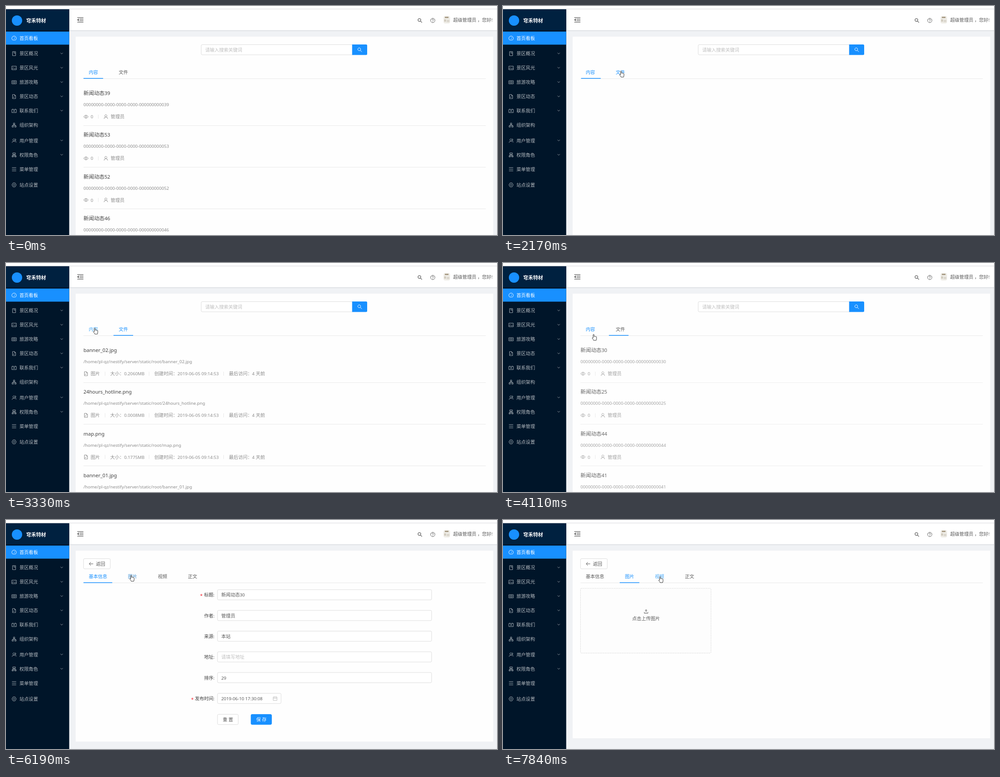
Animation, 1093 px wide and 512 px high, one loop 7990 ms. Source, as an HTML page:

```html
<!DOCTYPE html>
<html lang="zh-CN">
<head>
<meta charset="utf-8">
<style>
html, body { margin: 0; width: 100%; height: 100%; overflow: hidden; background: #fff }
svg { display: block; font-family: "Noto Sans", "Noto Sans CJK SC", "Noto Sans CJK", sans-serif }
text { white-space: pre }
.title tspan { font-weight: 500 }
</style>
</head>
<body>
<svg id="stage" width="1093" height="512" viewBox="0 0 1093 512"></svg>
<script>
const LOOP = 7990, BLUE = '#1890ff', HOVER = '#40a9ff', INK = '#595959', GREY = '#8c8c8c', SIZE = 10.3;

// Latin runs are set slightly smaller than the Chinese around them; y is the middle of the line.
const text = (x, y, s, fill = INK, size = SIZE, attrs = '') =>
  `<text x="${x}" y="${y + size * .37}" font-size="${size}" fill="${fill}" ${attrs}>` +
  s.replace(/[ -~]+/g, run => `<tspan font-size="${size * .945}">${run}</tspan>`) + '</text>';
const rect = (x, y, w, h, fill, attrs = '') =>
  `<rect x="${x}" y="${y}" width="${w}" height="${h}" fill="${fill}" ${attrs}/>`;
const box = (x, y, w, h, fill = '#fff', stroke = '#d4d4d4') =>
  rect(x, y, w, h, fill, `rx="2.5" stroke="${stroke}" stroke-width=".8"`);
const icon = (x, y, d, stroke = GREY, width = 1) =>
  `<path transform="translate(${x} ${y})" d="${d}" fill="none" stroke="${stroke}" stroke-width="${width}"/>`;
const group = (id, body) => `<g id="${id}">${body}</g>`;
const rule = y => rect(172.5, y, 895.5, .8, '#e4e4e4');

const ICON = {
  dash: 'M-3.3 4A5 5 0 1 1 3.3 4ZM0 1L2-1.5',
  book: 'M-3.5-4.5h7v9h-7zM0-4.5v4l1.5-1 1.5 1',
  picture: 'M-5-4H5V4H-5zM-5 2.5L-2-.5 .5 2 2.5 0 5 2.5',
  read: 'M0-3.5H-5v7H5v-7H0V3.5M-3.5-1h2M-3.5 1h2M1.5-1h2M1.5 1h2',
  file: 'M-3.5-4.5H1L3.5-2V4.5H-3.5zM1-4.5V-2H3.5M-2 2.5l1.3-2 1 1 1.2-1',
  contact: 'M-5-3H5V4H-5zM-3-4.5V-3M3-4.5V-3M-1.5 2.3L0-1.5 1.5 2.3',
  tree: 'M-1.5-4.5h3v3h-3zM-4.5 1.5h3v3h-3zM1.5 1.5h3v3h-3zM0-1.5V0M-3 1.5V0H3V1.5',
  users: 'M-.5-4a2.2 2.2 0 1 1-.1 0M-4.5 4.5A3.7 3.7 0 0 1 2 2.5M2-4a2 2 0 0 1 0 4Q4.3 1 4.5 4',
  roles: 'M-3-4.5h6v3h-6zM-4.5 2h2.5v2.5h-2.5zM2 2h2.5v2.5H2zM0-1.5V4.5M-3.5 2V.3H3.5V2',
  bars: 'M-4.7-3.7h9.4M-4.7 0h9.4M-4.7 3.7h9.4',
  gear: 'M-2.3-4.4H2.3L4.8 0 2.3 4.4H-2.3L-4.8 0zM1.7 0A1.7 1.7 0 1 1 1.7-.01z',
  search: 'M2-1.2A3.2 3.2 0 1 1 2-1.21zM1.1 1.1L4.6 4.6',
  eye: 'M-5 0Q0-7 5 0 0 7-5 0zM1.6 0A1.6 1.6 0 1 1 1.6-.01z',
  person: 'M2.4-2A2.4 2.4 0 1 1 2.4-2.01zM-4 4.7A4 4 0 0 1 4 4.7'
};

const menu = [
  [72, '首页看板', 'dash'], [106.5, '景区概况', 'book', 1], [138.5, '景区风光', 'picture', 1],
  [170.5, '旅游攻略', 'read', 1], [202.5, '景区动态', 'file', 1], [234.3, '联系我们', 'contact', 1],
  [266.3, '组织架构', 'tree'], [301, '用户管理', 'users', 1], [333, '权限角色', 'roles', 1],
  [365, '菜单管理', 'bars'], [400, '站点设置', 'gear']
].map(([y, label, name, arrow], i) => {
  const color = i ? '#b2b8be' : '#fff';
  return icon(18, y, ICON[name], color, .9) + text(30, y, label, color) +
    (arrow ? icon(124, y - .5, 'M-2.6-1.4L0 1.3 2.6-1.4', '#8c949c') : '');
}).join('');

const sidebar = rect(0, 7.5, 140.7, 504.5, '#001529') + rect(0, 7.5, 140.7, 47, '#002140') +
  rect(0, 57.2, 140.7, 29.2, BLUE) + `<circle cx="24.5" cy="32.5" r="11.5" fill="${BLUE}"/>` +
  text(45, 32.5, '穹禾特材', '#fff', 11, 'font-weight="700"') + menu;

const header = rect(0, 6.3, 1093, 1.2, '#d5d5da') + rect(140.5, 7.5, 952.5, 46.7, '#fff') +
  [.08, .045, .02].map((a, i) => rect(140.5, 54 + i, 952.5, 1, `rgba(0,21,41,${a})`)).join('') +
  icon(165.5, 31, 'M-6.8-5.2H6.8M-1.8-1.7H6.8M-1.8 1.7H6.8M-6.8 5.2H6.8M-4-2L-6.3 0-4 2z', INK, 1.2) +
  icon(921.5, 32.5, ICON.search, INK, 1.2) +
  icon(950, 32.3, 'M4.8 0A4.8 4.8 0 1 1 4.8-.01zM-1.6-1A1.6 1.6 0 1 1 .6.3L0 .7V1.3M0 2.2V3.2', INK) +
  rect(974, 22.5, 14.5, 16.5, '#eeece6', 'rx="4"') + rect(977, 24, 8, 3, '#a99c86') +
  rect(975.5, 30, 4, 5, '#cfcabd') + rect(981, 31, 6, 5, '#dcd8cf') +
  text(995.5, 31.5, '超级管理员 ，您好!');

const list = items => items.map(([title, desc, meta], i) => {
  const y = 195 + 93.1 * i;
  return text(172.5, y, title, '#404040', 11.7, 'class="title"') +
    text(172.5, y + 25.5, desc, GREY) + meta(y + 52.5) + rule(Math.round(y + 72));
}).join('');

const divider = (x, y) => rect(x, y - 4.5, 1, 9, '#e8e8e8');
const news = ids => list(ids.map(n => ['新闻动态' + n, '00000000-0000-0000-0000-0000000000' + n, y =>
  icon(178, y, ICON.eye) + text(188.5, y, '0', GREY) + divider(205, y) +
  icon(222.3, y, ICON.person) + text(233, y, '管理员', GREY)]));
const files = entries => list(entries.map(([name, size]) => [name, '/home/pl-qz/nestify/server/static/root/' + name, y =>
  icon(178, y, ICON.file) + text(188.5, y, '图片', GREY) + divider(220, y) +
  text(232, y, `大小：${size}MB`, GREY) + divider(318, y) +
  text(330.3, y, '创建时间：2019-06-05 09:14:53', GREY) + divider(484, y) +
  text(496.3, y, '最后访问：4 天前', GREY)]));

const searchPage = box(434.6, 86.4, 340, 22.7) + text(443.5, 98.5, '请输入搜索关键词', '#bfbfbf') +
  `<path d="M770.5 86H801.5a2.5 2.5 0 0 1 2.5 2.5V107a2.5 2.5 0 0 1-2.5 2.5H770.5z" fill="${BLUE}"/>` +
  icon(787.5, 98, ICON.search, '#fff') + rule(162) +
  text(184.2, 148, '内容', BLUE, SIZE, 'id="tabNews"') + text(251, 148, '文件', INK, SIZE, 'id="tabFiles"') +
  rect(172.5, 161, 43.7, 1.5, BLUE, 'id="listBar"');

const detailPage = box(172.6, 86.4, 59.5, 22.7) + icon(189.5, 98, 'M4.7 0H-4.2M-.5-3.8L-4.4 0-.5 3.8', INK) +
  text(200.3, 98, '返回') + rule(140.2) +
  text(184.2, 126, '基本信息', BLUE, SIZE, 'id="tabBasic"') + text(271.5, 126, '图片', INK, SIZE, 'id="tabImage"') +
  text(338.2, 126, '视频', INK, SIZE, 'id="tabVideo"') + text(405, 126, '正文') +
  rect(172.5, 139.4, 64, 1.5, BLUE, 'id="detailBar"');

const star = (x, y) => text(x, y + 1, '*', '#f5222d', 11);
const form = [['标题', '新闻动态30'], ['作者', '管理员'], ['来源', '本站'], ['地址', '请填写地址', '#bfbfbf'], ['排序', '29']]
  .map(([label, value, color], i) => {
    const y = 167.5 + 46.3 * i;
    return text(441, y, label + ':', '#404040') + box(470.8, y - 11.7, 476.7, 22.8) + text(479.3, y, value, color);
  }).join('') + star(432, 167.5) + star(412, 399.5) +
  text(420.4, 399.5, '发布时间:', '#404040') + box(470.8, 387.5, 141.5, 22.8) +
  text(479.3, 399.5, '2019-06-10 17:30:08') +
  icon(599, 399.3, 'M-4.2-3.5H4.2V4H-4.2zM-4.2-.7H4.2M-2-4.7V-2.5M2-4.7V-2.5', '#bfbfbf') +
  box(470.8, 434.5, 46.2, 22.8) + text(482.5, 446.3, '重 置') +
  box(545.3, 434.5, 46, 22.8, BLUE, BLUE) + text(557, 446.3, '保 存', '#fff');

const upload = rect(172.5, 152.8, 290.5, 144.7, '#fdfdfd', 'rx="2" stroke="#d4d4d4" stroke-dasharray="2.2 1.6"') +
  icon(318.5, 204.5, 'M-4 1.2V4H4V1.2M0 2V-4M-2.2-1.8L0-4 2.2-1.8', INK) + text(287.5, 219.8, '点击上传图片');

const cursor = `<g id="cursor" stroke="#222" stroke-width=".9" stroke-linejoin="round" fill="#fff">
  <path id="arrow" d="M-4-7V5L-1.2 2.5 .8 7 2.6 6.2 .7 1.9H4.4z"/>
  <path id="hand" d="M-2.4 1.5V-5.4a1.1 1.1 0 0 1 2.2 0V-1.6a1 1 0 0 1 1.9 0 1 1 0 0 1 1.8.4 1 1 0 0 1 1.7.6V3Q5.2 5 4.3 7H-1.2Q-2.3 4.6-4.3 2.2-4.3.2-2.4 1.5z"/></g>`;

const stage = document.getElementById('stage');
stage.innerHTML = rect(140.5, 54, 952.5, 458, '#f0f2f5') + rect(155, 68.5, 929.5, 460, '#fefefe', 'id="panel"') +
  header + sidebar +
  group('search', searchPage) + group('newsA', news([39, 53, 52, 46])) +
  group('files', files([['banner_02.jpg', '0.2060'], ['24hours_hotline.png', '0.0008'],
    ['map.png', '0.1775'], ['banner_01.jpg', '0.2060']])) +
  group('newsB', news([30, 25, 44, 41])) +
  group('detail', detailPage) + group('form', form) + group('upload', upload) + cursor;

const el = Object.fromEntries([...stage.querySelectorAll('[id]')].map(e => [e.id, e]));
const openedTitle = el.newsB.querySelector('.title');

const ramp = (t, from, to) => Math.min(1, Math.max(0, (t - from) / (to - from)));
const ease = p => p < .5 ? 4 * p ** 3 : 1 - 4 * (1 - p) ** 3;
const smooth = p => p * p * (3 - 2 * p);
const slide = (t, start) => ease(ramp(t, start, start + 300));
const show = (e, opacity) => {
  e.style.opacity = opacity;
  e.style.display = opacity > 0 ? '' : 'none';
};
const tint = (e, to, p, from = INK) => e.style.fill = `color-mix(in srgb, ${to} ${p * 100}%, ${from})`;

const track = [
  [140, 1014, 500], [540, 250, 113], [690, 250, 113], [1480, 264, 152], [2450, 264, 152],
  [2930, 204, 144], [3010, 204, 144], [3330, 199, 152], [3790, 199, 152], [4110, 203, 166],
  [4570, 215, 201], [5500, 215, 201], [6190, 280, 130], [7150, 280, 130], [7670, 351, 133]
];
function cursorAt(t) {
  const i = track.findIndex(k => k[0] > t);
  if (i < 1) return track.at(-1).slice(1);
  const [t0, x0, y0] = track[i - 1], [t1, x1, y1] = track[i], p = smooth(ramp(t, t0, t1));
  return [x0 + (x1 - x0) * p, y0 + (y1 - y0) * p];
}

function draw(t) {
  const leave = 1 - ramp(t, 4650, 4790);
  show(el.search, leave);
  show(el.newsA, t < 2170 ? 1 : 0);
  show(el.files, t < 3790 ? ramp(t, 2300, 2600) : 0);
  show(el.newsB, Math.min(ramp(t, 3860, 4170), leave));
  show(el.detail, ramp(t, 5500, 5700));
  show(el.form, t < 6890 ? ramp(t, 5500, 5700) : 0);
  show(el.upload, ramp(t, 6900, 7150));
  el.panel.setAttribute('height', (t < 4780 ? 520 : t >= 5500 && t < 6890 ? 495.5 : 488) - 68.5);

  el.listBar.setAttribute('x', 172.5 + 66.8 * (slide(t, 2120) - slide(t, 4040)));
  const toImage = slide(t, 6870);
  el.detailBar.setAttribute('x', 172.5 + 87.3 * toImage);
  el.detailBar.setAttribute('width', 64 - 20.3 * toImage);

  if (t < 2900) tint(el.tabNews, BLUE, 1 - ramp(t, 2170, 2470));
  else tint(el.tabNews, t < 3790 ? HOVER : BLUE, ramp(t, 2900, 3150));
  if (t < 3790) tint(el.tabFiles, t < 2170 ? HOVER : BLUE, ramp(t, 1300, 1600));
  else tint(el.tabFiles, BLUE, 1 - ramp(t, 3790, 4050));
  tint(openedTitle, BLUE, ramp(t, 4400, 4570), '#404040');
  tint(el.tabBasic, BLUE, 1 - ramp(t, 6890, 7190));
  tint(el.tabImage, t < 6890 ? HOVER : BLUE, ramp(t, 6020, 6250));
  tint(el.tabVideo, HOVER, ramp(t, 7600, 7850));

  const [x, y] = cursorAt(t), overTab = t > 1250;
  show(el.cursor, t < 140 ? 0 : 1);
  show(el.arrow, overTab ? 0 : 1);
  show(el.hand, overTab ? 1 : 0);
  el.cursor.setAttribute('transform', `translate(${x} ${y})`);
}

function tick() {
  draw(performance.now() % LOOP);
  requestAnimationFrame(tick);
}
tick();
</script>
</body>
</html>
```
